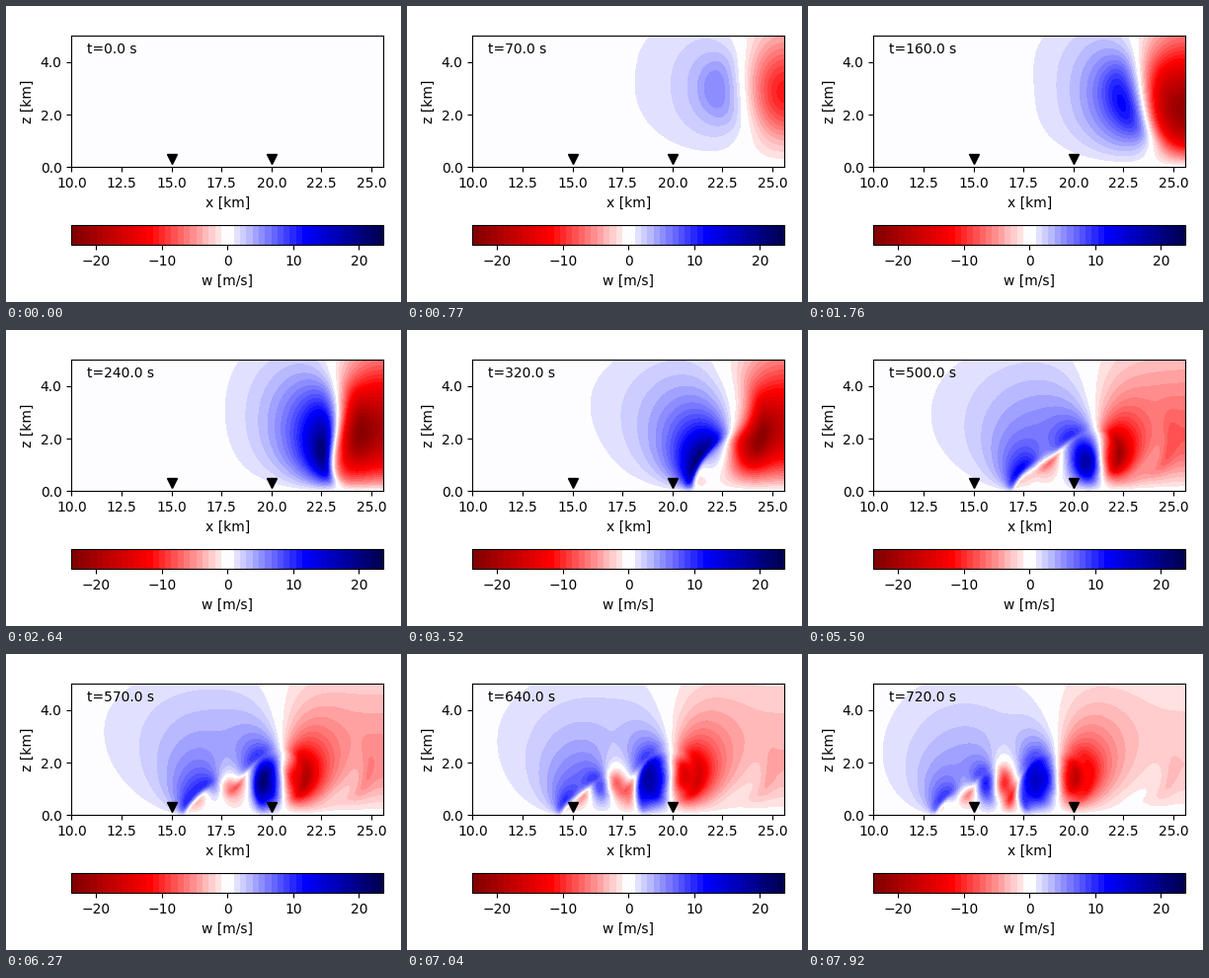
A matplotlib script that plays this animation: 400 px wide and 300 px high, repeating every 8 s.

```python
"""Vertical velocity of a cold-air density current spreading along the ground."""
import matplotlib.pyplot as plt
import numpy as np
from matplotlib.animation import FuncAnimation
from matplotlib.cm import ScalarMappable
from matplotlib.colors import BoundaryNorm, ListedColormap

# Stage and timing
WIDTH, HEIGHT, DPI = 400, 300, 100
FRAMES, LOOP_MS = 73, 8000
SECONDS_PER_FRAME = 10

# Air and grid (SI units); the right edge is the symmetry axis of the bubble
G, CP, CV, R, THETA0, NU = 9.81, 1004.5, 717.5, 287.0, 300.0, 75.0
DX, NX, NZ = 100.0, 256, 64
DT, SOUND_STEPS = 2.0, 12
DS = DT / SOUND_STEPS
LAPSE = G / (CP * THETA0)

x = (np.arange(NX) + 0.5) * DX
z = (np.arange(NZ) + 0.5) * DX
exner = (1 - LAPSE * z)[:, None]
stiffness = R / CV * exner


def mid(q, axis):
    """Average of neighbours."""
    return 0.5 * (q[1:] + q[:-1]) if axis == 0 else 0.5 * (q[:, 1:] + q[:, :-1])


def widths(axis, n):
    return [(n, n) if a == axis else (0, 0) for a in (0, 1)]


def to_faces(q, axis):
    return mid(np.pad(q, widths(axis, 1), mode="edge"), axis)


def divergence(u, w):
    return (u[:, 1:] - u[:, :-1] + w[1:] - w[:-1]) / DX


def transport(q, speed, axis, odd=False):
    """Fifth-order upwind advection plus diffusion along one axis."""
    if odd:
        p = np.pad(q, widths(axis, 3), mode="reflect", reflect_type="odd")
    else:
        p = np.pad(q, widths(axis, 3), mode="symmetric")
    n = q.shape[axis]
    a3, a2, a1, c, b1, b2, b3 = (
        p[i:i + n] if axis == 0 else p[:, i:i + n] for i in range(7))
    near = a1 + b1
    centred = 45 * (b1 - a1) - 9 * (b2 - a2) + b3 - a3
    rough = a3 + b3 - 6 * (a2 + b2) + 15 * near - 20 * c
    advection = (np.abs(speed) * rough - speed * centred) / (60 * DX)
    return advection + NU / DX**2 * (near - 2 * c)


def slow_terms(u, w, theta, p):
    uc, wc = mid(u, 1), mid(w, 0)
    fu = transport(u, u, 1, odd=True) + transport(u, to_faces(wc, 1), 0)
    fw = (transport(w, to_faces(uc, 0), 1) + transport(w, w, 0, odd=True)
          + G / THETA0 * to_faces(theta, 0))
    ftheta = transport(theta, uc, 1) + transport(theta, wc, 0)
    fp = (transport(p, uc, 1) + transport(p, wc, 0)
          - R / CV * p * divergence(u, w))
    return fu, fw, ftheta, fp


def advance(state):
    """One Runge-Kutta step with short sub-steps for the sound waves."""
    stage = state
    for parts in (SOUND_STEPS // 3, SOUND_STEPS // 2, SOUND_STEPS):
        fu, fw, ftheta, fp = slow_terms(*stage)
        push_u = CP / DX * (THETA0 + mid(stage[2], 1))
        push_w = CP / DX * (THETA0 + mid(stage[2], 0))
        u, w, p = state[0].copy(), state[1].copy(), state[3]
        damped = p
        for _ in range(parts):
            u[:, 1:-1] += DS * (fu[:, 1:-1]
                                - push_u * (damped[:, 1:] - damped[:, :-1]))
            w[1:-1] += DS * (fw[1:-1] - push_w * (damped[1:] - damped[:-1]))
            change = DS * (fp - stiffness * divergence(u, w)
                           + LAPSE * mid(w, 0))
            p = p + change
            damped = p + 0.1 * change
        stage = (u, w, state[2] + parts * DS * ftheta, p)
    return stage


def simulate():
    """Vertical velocity in the visible window, one field per frame."""
    radius = np.hypot((x[None, :] - NX * DX) / 4000, (z[:, None] - 3000) / 2000)
    cooling = -7.5 * (1 + np.cos(np.pi * np.minimum(radius, 1)))
    state = (np.zeros((NZ, NX + 1)), np.zeros((NZ + 1, NX)),
             cooling / exner, np.zeros((NZ, NX)))
    fields = []
    for frame in range(FRAMES):
        if frame:
            for _ in range(int(SECONDS_PER_FRAME / DT)):
                state = advance(state)
        view = state[1][:52, 99:]
        fields.append(np.hstack([view, view[:, -1:]]))
    return fields


fields = simulate()
view_x = 9.95 + 0.1 * np.arange(fields[0].shape[1])
view_z = 0.1 * np.arange(fields[0].shape[0])

# Colour bands; the two around zero are joined into one white band
BAND = 0.95
steps = np.arange(1, 26) * BAND
levels = np.concatenate([-steps[::-1], steps])
top = levels[-1]
colors = plt.get_cmap("seismic_r")((mid(levels, 0) + top) / (2 * top))

fig = plt.figure(figsize=(WIDTH / DPI, HEIGHT / DPI), dpi=DPI, facecolor="white")


def add_axes(left, upper, right, lower):
    return fig.add_axes([left / WIDTH, 1 - lower / HEIGHT,
                         (right - left) / WIDTH, (lower - upper) / HEIGHT])


ax = add_axes(66.4, 30.4, 382.2, 163.4)
ax.set(xlim=(10, 25.6), ylim=(0, 5), xlabel="x [km]", ylabel="z [km]",
       xticks=np.arange(10, 25.1, 2.5), yticks=[0, 2, 4])
ax.xaxis.set_major_formatter("{x:.1f}")
ax.yaxis.set_major_formatter("{x:.1f}")
ax.plot([15, 20], [0.3, 0.3], "kv", markersize=7)
clock = ax.text(0.05, 0.87, "", transform=ax.transAxes)

bar = fig.colorbar(
    ScalarMappable(BoundaryNorm(levels, len(colors)), ListedColormap(colors)),
    cax=add_axes(66.4, 222.4, 382.2, 242.4), orientation="horizontal",
    spacing="proportional", ticks=[-20, -10, 0, 10, 20], label="w [m/s]")
bar.minorticks_off()


def update(frame):
    for shading in list(ax.collections):
        shading.remove()
    w = np.clip(fields[frame], -top + 0.01, top - 0.01)
    ax.contourf(view_x, view_z, w, levels=levels, colors=colors)
    clock.set_text(f"t={frame * SECONDS_PER_FRAME:.1f} s")
    return [clock]


animation = FuncAnimation(fig, update, frames=FRAMES, interval=LOOP_MS / FRAMES,
                          repeat=True, blit=False)
plt.show()
```
